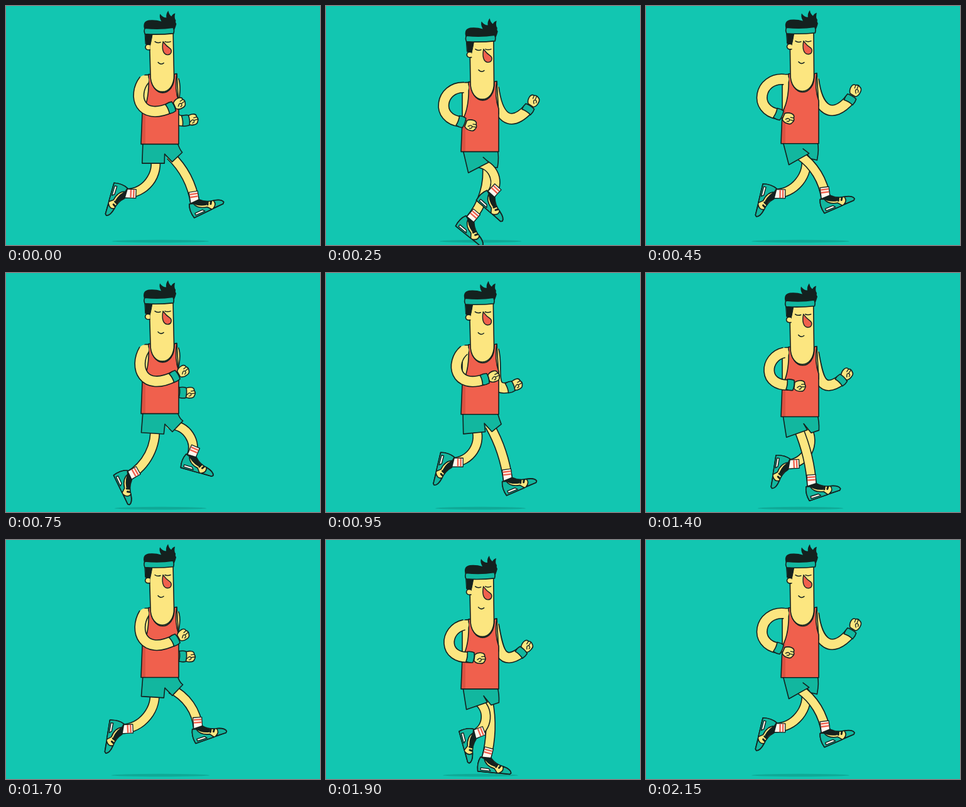
Animation of 500x380 px, one loop 2.2 s. Source, as an HTML page with a canvas:

```html
<!DOCTYPE html>
<html lang="en">
<head>
<meta charset="utf-8">
<title>Runner</title>
<style>
html, body { margin: 0; width: 100%; height: 100%; overflow: hidden; background: #12c6b1; }
canvas { display: block; }
</style>
</head>
<body>
<canvas id="stage" width="500" height="380"></canvas>
<script>
const ctx = document.getElementById('stage').getContext('2d');
const LOOP = 2200, STEP = 50, STRIDE = 850, FLOOR = 348;
const BG = '#12c6b1', TEAL = '#12b79f', SKIN = '#fce680', RED = '#f0604d',
      SHADE = '#dc5342', INK = '#14211f', WHITE = '#fff8ee', LINE = 1.6;

// Each part swings between two poses. Arms: c1, c2, wrist, fist.
const NEAR_ARM = [[204,147, 220,187, 271,160, 284,152], [180,113, 167,166, 209,174, 224,181]];
const FAR_ARM = [[276,140, 242,188, 280,188, 290,189], [273,168, 298,183, 327,148, 335,134]];
// Hem of the shorts: near left, near right, slit, far left, far right
const HEM = [[215,250, 251,253, 253,237, 265,249, 282,231], [228,254, 260,235, 250,228, 262,244, 272,247]];

const { sin, cos, atan2, hypot, PI } = Math;
const blend = ([a, b], s) => a.map((v, i) => v + (b[i] - v) * s);
const wave = (phase, peak, period = STRIDE) => cos(2 * PI * (phase - peak) / period);

function shape(d, fill, line = LINE) {
  const p = new Path2D(d);
  if (fill) { ctx.fillStyle = fill; ctx.fill(p); }
  if (line) { ctx.strokeStyle = INK; ctx.lineWidth = line; ctx.stroke(p); }
}

function at(x, y, angle, draw) {
  ctx.save();
  ctx.translate(x, y);
  ctx.rotate(angle);
  draw();
  ctx.restore();
}

// The outline is cut square and the skin is round, so joints blend into the body
function limb(x, y, curve, width) {
  const p = new Path2D(`M${x},${y}C${curve}`);
  for (const [color, w, cap] of [[INK, width, 'butt'], [SKIN, width - 2 * LINE, 'round']]) {
    ctx.strokeStyle = color;
    ctx.lineWidth = w;
    ctx.lineCap = cap;
    ctx.stroke(p);
  }
}

function arm(x, y, v) {
  const [bx, by, hx, hy] = v.slice(4);
  const angle = atan2(hy - by, hx - bx);
  limb(x, y, v.slice(0, 6), 18);
  at(hx, hy, angle, () => {
    shape('M-8,-5Q-4,-9 2,-9Q8,-9 8,-4Q11,-1 9,3Q8,8 2,8Q-4,9 -8,5Z', SKIN);
    shape('M8,-4L3,-3M9,0L4,1M-3,3Q1,-2 3,1Q4,5 0,5', null, 1.3);
  });
  at(bx, by, angle, () => shape('M-6,-8Q0,-9.5 5,-8Q7,0 5,8Q0,9.5 -6,8Q-4,0 -6,-8Z', TEAL));
}

function shoe() {
  shape('M-9,-2L8,-2Q16,7 29,9Q41,12 42,18L40,20L-11,21Q-14,8 -9,-2Z', SKIN);
  shape('M-9,-2L-3,0Q0,11 15,14L20,20.5L-11,21Q-14,8 -9,-2Z', TEAL);
  shape('M-7,15L6,15L9,18.5L-7,18.5Z', WHITE, 1.4);
  shape('M28,9Q41,12 42,18L40,20L23,20Q31,16 28,9Z', TEAL);
  shape('M-5,-2L8,-2Q13,4 19,7L15,11Q2,8 -5,-2Z', INK, 0);
  shape('M19,7L17,11M24,9L22,12', null, 3);
}

// Rubber-hose leg: an arc from hip to ankle that ends along the shin
function leg(phase, shift, bob) {
  const swing = -wave(phase, -10);
  const hx = 240 + 4 * swing + shift, hy = 238 + bob;
  const x = 236 + 52 * swing + shift;
  const y = Math.min(FLOOR, 308 + bob - 22 * wave(phase, 215) - 7 * wave(phase, -35, STRIDE / 2));
  const tilt = (41 + 66 * wave(phase, 62)) * PI / 180;
  const shin = -0.77 * (tilt + 0.23);

  const chord = atan2(x - hx, y - hy), thigh = 2 * chord - shin;
  const reach = hypot(x - hx, y - hy) / (3 * cos((thigh - shin) / 4) ** 2);
  limb(hx, hy, [hx + reach * sin(thigh), hy + reach * cos(thigh),
    x - reach * sin(shin), y - reach * cos(shin), x, y], 16);

  at(x, y, PI / 2 - shin, () => {
    shape('M-18,-7L2,-7L2,7L-18,7Z', WHITE, 1.3);
    ctx.fillStyle = RED;
    for (const band of [-15.5, -11]) ctx.fillRect(band, -6.3, 2.4, 12.6);
  });
  at(x, y, tilt, shoe);
}

function farShorts([, , , , kx, ky, px, py, qx, qy]) {
  shape(`M230,217L${kx},${ky}L${px},${py}L${qx},${qy}Q276,228 273,217Z`, TEAL);
}

function nearShorts([lx, ly, rx, ry, kx, ky]) {
  const hem = `M218,217L${lx},${ly}L${rx},${ry}L${kx},${ky}`;
  shape(hem + 'L262,217Z', TEAL, 0);
  shape(hem);
}

function torso() {
  const shirt = 'M227,109L231,109C229,148 270,148 268,109L272,108Q268,132 275,152L275,220L215,220' +
    'L217,170Q229,150 227,109Z';
  shape('M222,110Q217,112 217,122L217,170L240,180L275,160L272,109Z', SKIN);
  shape(shirt, RED, 0);
  ctx.save();
  ctx.clip(new Path2D(shirt));
  ctx.fillStyle = SHADE;
  ctx.fillRect(214, 164, 8, 58);
  ctx.restore();
  shape(shirt);
}

function head(s) {
  const sway = 3 * s;
  shape(`M${228 + s},42L230,109C229,146 269,146 267.5,109L${266 + s},42Z`, SKIN);
  at(s, 0, 0, () => {
    shape('M237,57Q241,60 246,58M253,57Q257,59 262,57M242,90Q246,95 251,91', null, 1.5);
    shape('M250,57C248,67 249,77 257,78C264,78 265,70 260,67C255,64 253,61 250,57', RED, 1.4);
  });
  at(sway, 0, 0, () => {
    shape('M221,44L233,44Q231,56 229,64L222,61Z', INK, 1);
    shape('M229,62Q222,60 221.5,66Q222,71 229,70', SKIN);
    shape('M220,38Q216,25 227,23Q238,22 247,25Q243,18 245,13Q249,19 255,19Q254,13 258,8' +
      'Q259,14 263,17Q265,13 269,12Q267,20 270,23Q269,26 271,29Q270,33 268,38Z', INK, 0);
    shape('M221,35.5Q244,38 266,34.5Q268,39 266.5,44Q244,46.5 221,45Q218.5,40 221,35.5Z', TEAL);
  });
}

function draw(time) {
  // The run starts one step ahead and settles into its beat
  const phase = Math.max(time, 50 + time * 8 / 9);
  const swing = 0.52 * (1 - wave(phase, -50));
  const bob = 18.5 * Math.abs(sin(2 * PI * (phase + 4) / STRIDE)) ** 3 - 1.5;
  const hem = blend(HEM, swing);
  const body = part => at(0, bob, 0, part);

  ctx.fillStyle = BG;
  ctx.fillRect(0, 0, 500, 380);
  ctx.fillStyle = 'rgba(10,125,112,.4)';
  ctx.beginPath();
  ctx.ellipse(246, 374, 77 - bob, 2.2, 0, 0, 2 * PI);
  ctx.fill();

  body(() => arm(267, 118, blend(FAR_ARM, swing)));
  leg(phase + STRIDE / 2, 18, bob);
  body(() => farShorts(hem));
  leg(phase, 0, bob);
  body(() => {
    nearShorts(hem);
    torso();
    head(swing);
    arm(220, 118, blend(NEAR_ARM, swing));
  });
}

ctx.lineJoin = ctx.lineCap = 'round';
const start = performance.now();
function tick() {
  const t = (performance.now() - start) % LOOP;
  draw(Math.floor(t / STEP) * STEP);
  requestAnimationFrame(tick);
}
tick();
</script>
</body>
</html>
```
